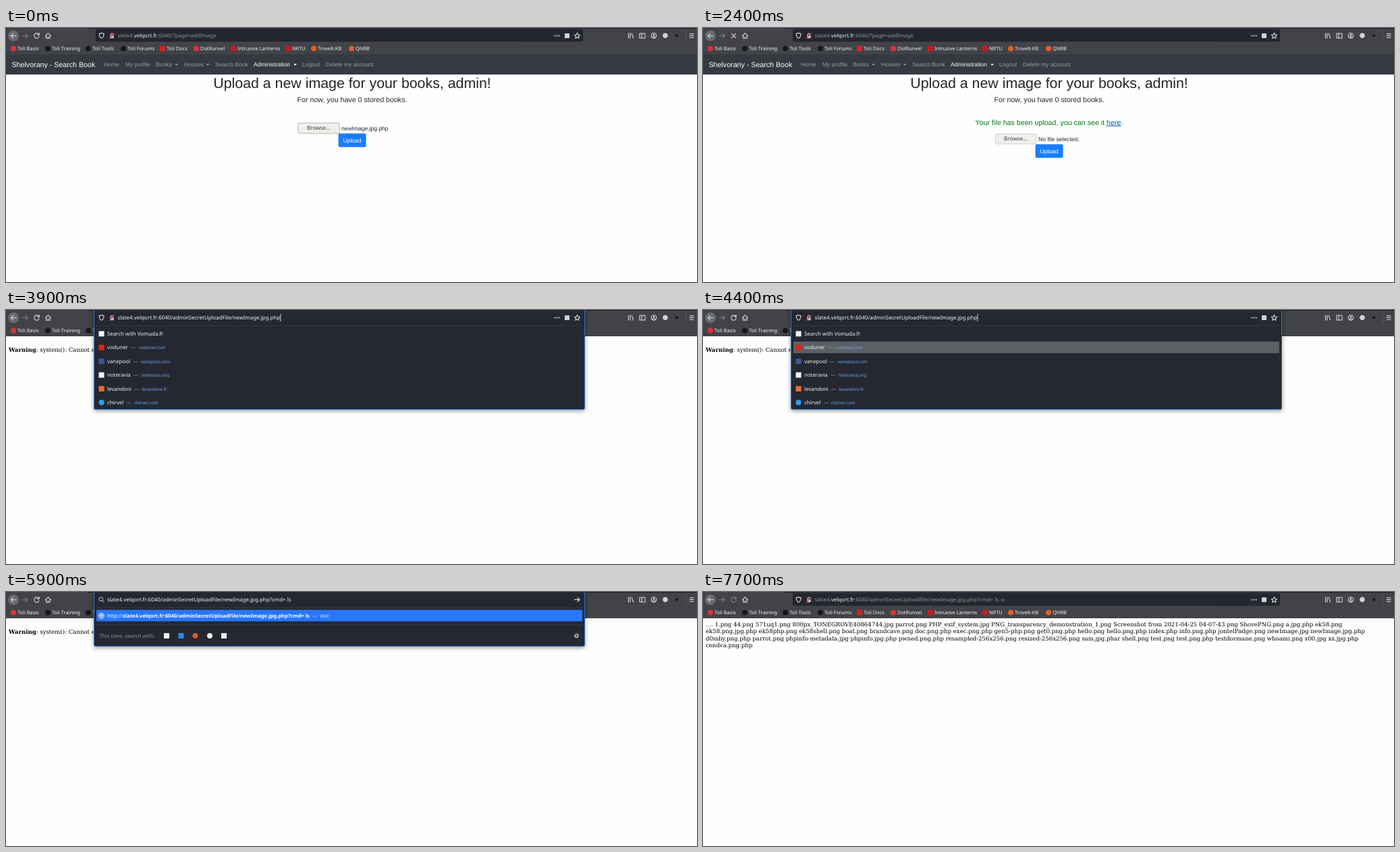
An HTML page that plays this animation: 1024 px wide and 377 px high, repeating every 8000 ms.

```html
<!DOCTYPE html>
<html lang="en">
<head>
<meta charset="utf-8">
<title>Upload walkthrough</title>
<style>
html, body { margin: 0; width: 100%; height: 100%; overflow: hidden; background: #fefefe; }
svg { display: block; width: 1024px; height: 377px; }
text { white-space: pre; text-rendering: geometricPrecision; }
.ui { font-family: "Noto Sans", "Open Sans", sans-serif; }
.web { font-family: "Liberation Sans", Arial, sans-serif; }
.doc { font-family: "DejaVu Serif", serif; font-size: 8.57px; fill: #000; }
.b { font-weight: 700; }
.line { fill: none; stroke: #dcdcde; stroke-width: 1.1; stroke-linecap: round; stroke-linejoin: round; }
.hover { fill: #0056b3; text-decoration: underline; }
</style>
</head>
<body>
<svg id="stage" viewBox="0 0 1024 377"></svg>
<script>
const HOST = ["slate4.", "velqort.fr", ":6040"];
const PAGE = "/?page=addImage";
const FILE = "/adminSecretUploadFile/newImage.jpg.php";
const LOOP = 8000;

// [start, text after the address]
const TYPING = [
  [0, ""], [4600, "?"], [4800, "?c"], [5100, "?cm"], [5300, "?cmd"], [5500, "?cmd="],
  [5700, "?cmd= "], [5800, "?cmd= l"], [5900, "?cmd= ls"], [6200, "?cmd= ls "],
  [6400, "?cmd= ls -"], [6600, "?cmd= ls -a"]
];

const text = (x, y, size, str, fill, cls = "ui", more = "") =>
  `<text x="${x}" y="${y}" font-size="${size}" fill="${fill}" class="${cls}" ${more}>${str}</text>`;
const rect = (x, y, w, h, fill, more = "") =>
  `<rect x="${x}" y="${y}" width="${w}" height="${h}" fill="${fill}" ${more}/>`;
const dot = (x, y, r, fill) => `<circle cx="${x}" cy="${y}" r="${r}" fill="${fill}"/>`;
const path = (d, more = "") => `<path class="line" d="${d}" ${more}/>`;
const group = (id, body, more = "") => `<g id="${id}" ${more}>${body}</g>`;
const mark = (x, y, color, round) =>
  round ? dot(x, y, 4, color) : rect(x - 4, y - 4, 8, 8, color);

// Bookmarks: text x, label, icon colour, round icon
const bookmarks = [
  [17, "Toli Basis", "#d8343a", 1], [68, "Toli Training", "#17181b", 1],
  [128, "Toli Tools", "#17181b", 1], [180, "Toli Forums", "#17181b", 1],
  [238, "Toli Docs", "#d8221c", 0], [288, "DotRunvel", "#d8343a", 1],
  [343, "Intrusive Lanterns", "#c8191f", 0], [424, "NRTU", "#c8191f", 0],
  [462, "Trovelt-KB", "#e0611f", 1], [518, "QNRB", "#e0611f", 1]
];

const chrome =
  rect(0, 0, 1024, 39, "#414349") + rect(121, 0, 903, 1, "#1b1c21") +
  dot(11, 11.5, 8, "#676a6f") +
  path("M15 11.5H7.5M10.7 8.2L7.4 11.5L10.7 14.8") +
  path("M24.5 11.5H32M28.8 8.2L32.1 11.5L28.8 14.8", 'opacity=".4"') +
  group("reload", path("M48.6 9.6A3.7 3.7 0 1 0 49 12.6M49.2 7.6V10.2H46.6")) +
  group("stop", path("M42.4 8.4L48.6 14.6M48.6 8.4L42.4 14.6")) +
  path("M58.4 11.6L62.4 7.7L66.4 11.6M59.6 11.4V15.2H65.2V11.4M62.4 15V12.8") +
  path("M922.5 7.7V15M925 7.7V15M927.3 7.9L929.6 15", 'stroke-width="1.4"') +
  path("M939 8H947V15H939ZM942.2 8V15") +
  `<circle class="line" cx="960" cy="11.3" r="3.8"/>` + dot(960, 10.3, 1.4, "#dcdcde") +
  path("M957.8 13.6Q960 11.8 962.2 13.6") +
  dot(977, 11.3, 3.7, "#d2d2d4") + dot(994, 11.3, 2.2, "#17181b") +
  rect(1007.5, 3, .7, 17, "#606267") +
  path("M1013.3 8.5H1019M1013.3 11.4H1019M1013.3 14.3H1019") +
  group("markHover", rect(410, 23, 42, 15, "#5c5f65", 'rx="2"')) +
  bookmarks.map(([x, label, color, round]) =>
    mark(x - 6, 30.5, color, round) + text(x, 33, 7.4, label, "#f2f2f3")).join("");

// Site navigation: x, label, menu arrow x
const nav = [
  [145, "Home"], [177, "My profile"], [222, "Books", 250], [264, "Houses", 296.5],
  [310, "Search Book"], [367, "Administration", 426], [439, "Logout"], [474, "Delete my account"]
];

const uploadPage =
  rect(0, 39, 1024, 30, "#343a40") +
  text(8.5, 57.6, 10.67, "Shelvorany - Search Book", "#fff", "web") +
  nav.map(([x, label, arrow]) => {
    const color = x === 367 ? "#fff" : "#999ca0";
    return text(x, 57.1, 8.53, label, color, "web") +
      (arrow ? `<path d="M${arrow} 53.2h5l-2.5 2.6z" fill="${color}"/>` : "");
  }).join("") +
  text(513, 89.2, 21.33, "Upload a new image for your books, admin!", "#212529", "web", 'text-anchor="middle"') +
  text(513, 110.4, 10.67, "For now, you have 0 stored books.", "#212529", "web", 'text-anchor="middle"') +
  group("done", text(513, 143.7, 10.67,
    'Your file has been upload, you can see it <tspan id="link" fill="#007bff">here</tspan>.',
    "#007a1a", "web", 'text-anchor="middle"')) +
  group("form",
    group("focus", rect(432.3, 140.3, 62.4, 17, "#d3d3d0", 'rx="2"')) +
    rect(433.3, 141.3, 60.6, 14.8, "#efefec", 'rx="1.6" stroke="#bdbdb9" stroke-width=".7"') +
    text(446, 151.4, 8.1, "Browse…", "#35383b") +
    text(497, 151.6, 8.53, "", "#212529", "web", 'id="chosen"') +
    rect(492.6, 156.4, 41, 20.4, "#1a7dff", 'id="send" rx="2.1" stroke="#80bdff" stroke-width="0"') +
    text(499.5, 170, 8.53, "Upload", "#fff", "web"));

const warning = `<text x="4" y="61.6" class="doc"><tspan class="b">Warning</tspan>: system(): Cannot execute a blank command in ` +
  `<tspan class="b">/var/www/html${FILE}</tspan> on line <tspan class="b">2</tspan></text>`;

const listing = [
  ". .. 1.png 44.png 571uq1.png 800px_TONEGROVE40864744.jpg parrot.png PHP_exif_system.jpg PNG_transparency_demonstration_1.png Screenshot from 2021-04-25 04-07-43.png ShovePNG.png a.jpg.php ek58.png",
  "ek58.png.jpg.php ek58php.png ek58shell.png boat.png brandcave.png doc.png.php exec.png.php gen5-php.png get0.png.php hello.png hello.png.php index.php info.png.php jontelPadge.png newImage.jpg newImage.jpg.php",
  "d0mby.png.php parrot.png phpinfo-metadata.jpg phpinfo.jpg.php pwned.png.php resampled-256x256.png resized-256x256.png sam.jpg.phar shell.png test.png test.png.php testdormane.png whoami.png x00.jpg xx.jpg.php",
  "cendva.png.php"
].map((s, i) => `<text x="4" y="${51.3 + i * 10.13}" class="doc">${s}</text>`).join("");

// Suggestions: name, domain ending, icon colour, round icon
const sites = [
  ["voduner", ".com", "#e62117", 0], ["vanepool", ".com", "#3b5998", 0],
  ["noteravia", ".org", "#f4f4f4", 0], ["levandoni", ".fr", "#ee6a32", 0],
  ["chirvel", ".com", "#2aa3ef", 1]
];
const rowY = i => 35 + i * 20.4;

const suggestions = sites.map(([name, end, color, round], i) => {
  const y = rowY(i + 1);
  return mark(141.5, y + .3, color, round) +
    text(150, y + 2.9, 7.84, `${name}<tspan dx="4" fill="#a0a2a6">—</tspan>` +
      `<tspan dx="3.6" font-size="6.64" fill="#6fa8ee">${name}${end}</tspan>`, "#f2f2f3");
}).join("");

const panel =
  rect(130.5, -3, 727, 151, "#252831", 'id="box" rx="2" stroke="#2b6fd0" stroke-width="1" style="filter:drop-shadow(0 2px 3px #0006)"') +
  rect(134, 23, 720, .7, "#3c3f47") +
  group("searchRow", mark(141.5, 35.3, "#f4f4f4", 0) + text(150, 37.9, 7.84, "Search with Vomuda.fr", "#f2f2f3")) +
  rect(134, 0, 720, 17.2, "#5d6165", 'id="rowHover"') +
  group("sites", suggestions) +
  group("visitRow",
    rect(134, 26.4, 720, 17.2, "#2777ff", 'rx="1"') +
    `<circle class="line" cx="141.5" cy="35.4" r="3.8" stroke="#fff"/>` +
    path("M137.8 35.4H145.2M141.5 31.6Q138.6 35.4 141.5 39.2Q144.4 35.4 141.5 31.6", 'stroke-width=".8"') +
    text(150, 37.9, 7.75, 'http://<tspan id="visit" class="b" font-size="7.57"></tspan>' +
      '<tspan dx="4" fill="#b9d3ff">—</tspan><tspan dx="3.4" font-size="7" fill="#dce9ff">Visit</tspan>', "#fff")) +
  group("engines",
    rect(134, -33, 720, .7, "#3c3f47") +
    text(138.5, -13.3, 7.84, "This time, search with:", "#8f9197") +
    mark(238, -16, "#f4f4f4", 0) + mark(259.5, -16, "#2a86e0", 0) + mark(280.5, -16, "#de5833", 1) +
    mark(302, -16, "#f4f4f4", 1) + mark(323, -16, "#f4f4f4", 0) +
    `<circle class="line" cx="845.5" cy="-16" r="2"/>` +
    `<circle class="line" cx="845.5" cy="-16" r="3.3" stroke-dasharray="1 1.59" style="stroke-linecap:butt"/>`);

const bar =
  rect(133.5, 2.5, 721, 17.2, "#24272f", 'id="field" rx="2" stroke-width="1"') +
  group("panel", panel) +
  group("siteIcons",
    path("M138.2 8.4Q140 8.2 141.6 7.4Q143.2 8.2 145 8.4Q145 13.3 141.6 15.4Q138.2 13.3 138.2 8.4Z") +
    rect(154.3, 11, 5.4, 4.2, "#c4c4c8", 'rx=".6"') + path("M155.4 11V9.6A1.6 1.6 0 0 1 158.6 9.6V11") +
    path("M153.3 15.4L160.7 7.8", 'style="stroke:#e8324e"') +
    dot(813.3, 11.5, 1, "#dcdcde") + dot(816.5, 11.5, 1, "#dcdcde") + dot(819.7, 11.5, 1, "#dcdcde") +
    rect(828, 8, 7, 7, "#d2d2d4") +
    path("M846.5 7.2L847.7 10L850.7 10.3L848.4 12.3L849.1 15.3L846.5 13.7L843.9 15.3L844.6 12.3L842.3 10.3L845.3 10Z")) +
  group("searchIcons",
    `<circle class="line" cx="140.7" cy="10.6" r="2.8" style="stroke:#a4a6aa"/>` +
    path("M142.8 12.8L145.2 15.2", 'style="stroke:#a4a6aa"') +
    path("M842.5 11.4H850M847 8.3L850.2 11.4L847 14.5")) +
  rect(165, 5.5, 242, 12.5, "#2f74d8", 'id="selection"') +
  text(165.5, 14.2, 7.92, '<tspan id="sub"></tspan><tspan fill="#f4f4f5"></tspan><tspan id="rest"></tspan>', "#fff", "ui", 'id="url"') +
  rect(406.3, 6, .8, 11, "#fff", 'id="caret"');

document.getElementById("stage").innerHTML =
  rect(0, 0, 1024, 377, "#fefefe") + group("uploadPage", uploadPage) +
  group("warning", warning) + group("listing", listing) + chrome + bar;

const el = id => document.getElementById(id);
const show = (id, on) => el(id).setAttribute("visibility", on ? "inherit" : "hidden");
const set = (id, attrs) => { for (const k in attrs) el(id).setAttribute(k, attrs[k]); };
const put = (node, s) => { if (node.textContent !== s) node.textContent = s; };

put(el("sub"), HOST[0]);
put(el("sub").nextSibling, HOST[1]);

function render(t) {
  const within = (a, b) => t >= a && t < b;
  const uploaded = t >= 500;
  const focused = within(3400, 6900);
  const open = within(3600, 6900);
  const editing = within(4600, 6900);
  const typed = TYPING.filter(step => step[0] <= t).pop()[1];

  // Pages
  show("uploadPage", t < 2500);
  show("done", t < 2500 && uploaded);
  show("focus", t < 200);
  set("form", { transform: `translate(0 ${uploaded ? 16 : 0})` });
  put(el("chosen"), uploaded ? "No file selected." : "newImage.jpg.php");
  const pressed = within(200, 500);
  set("send", { fill: pressed ? "#0062cc" : "#1a7dff", "stroke-width": pressed ? 1.6 : 0 });
  set("link", { class: within(1700, 2500) ? "hover" : "" });
  show("warning", within(2500, 7200));
  show("listing", t >= 7200);

  // Toolbar
  const loading = within(300, 900) || within(2400, 2700) || within(6900, 7300);
  show("stop", loading);
  show("reload", !loading);
  set("reload", { opacity: within(900, 1500) || t >= 7300 ? .4 : 1 });
  show("markHover", within(3000, 3100));

  // Address field
  const grow = focused ? 1.5 : 0;
  set("field", {
    x: 133.5 - grow, y: focused ? .5 : 2.5, width: 721 + 2 * grow,
    height: focused ? 21.5 : 17.2, stroke: focused ? "#2b6fd0" : "#1d1f26"
  });
  show("siteIcons", !editing);
  show("searchIcons", editing);
  show("selection", within(3500, 3900));
  const color = focused ? "#f4f4f5" : "#909298";
  set("sub", { fill: color });
  set("rest", { fill: color });
  set("url", { x: editing ? 150 : 165.5 });
  put(el("rest"), HOST[2] + (t < 2500 ? PAGE : FILE + typed));
  show("caret", within(3400, 3500) || within(3900, 4600) || within(6200, 6400));
  set("caret", { x: editing ? 426 : 406.5 });

  // Suggestion panel
  const stale = t < 4700;
  const bottom = !editing ? 148 : stale ? 181 : 81;
  show("panel", open);
  set("box", { height: bottom + 2.5 });
  show("searchRow", open && !editing);
  show("sites", open && stale);
  show("visitRow", editing);
  show("engines", editing);
  set("engines", { transform: `translate(0 ${bottom})` });
  put(el("visit"), HOST.join("") + FILE + typed.trimEnd());
  show("rowHover", within(4300, 4600));
  set("rowHover", { y: rowY(t < 4400 ? 5 : 1) - 8.6 });
}

function tick() {
  render(performance.now() % LOOP);
  requestAnimationFrame(tick);
}
tick();
</script>
</body>
</html>
```
